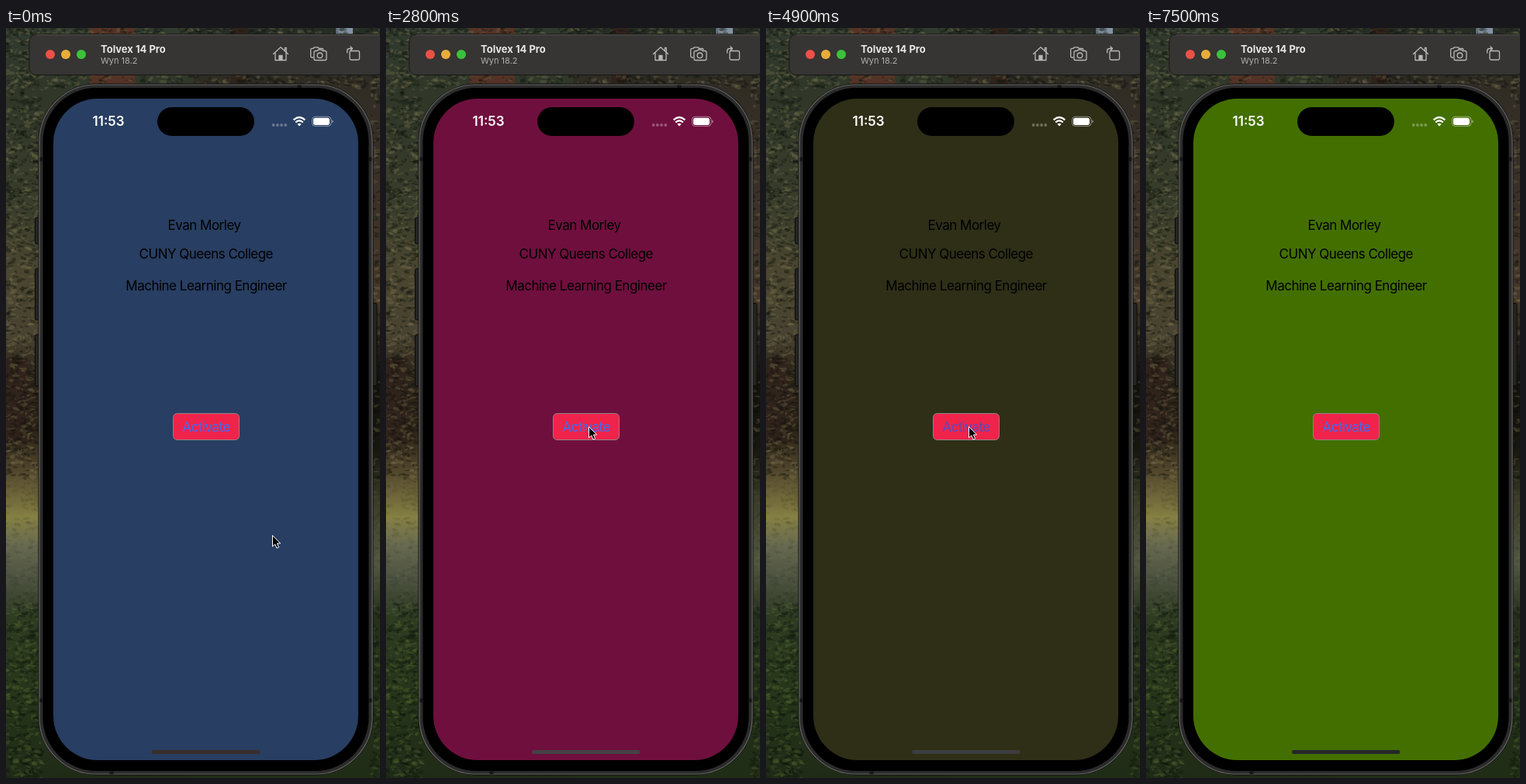
An HTML page with a canvas for the animation above (7.6 s loop, 482 by 966 pixels).

```html
<!DOCTYPE html>
<html lang="en">
<head>
<meta charset="utf-8">
<title>Colour button</title>
<style>
  html, body { margin: 0; width: 100%; height: 100%; overflow: hidden; background: #222a1e; }
  canvas, svg { position: absolute; left: 0; top: 0; width: 482px; height: 966px; }
  text { font-family: Inter, "Liberation Sans", sans-serif; }
  .label { font-size: 17px; letter-spacing: -.5px; text-anchor: middle; }
  .icon { fill: none; stroke: #bab8b6; stroke-width: 1.3; stroke-linejoin: round; stroke-linecap: round; }
</style>
</head>
<body>
<canvas id="forest" width="482" height="966"></canvas>
<svg viewBox="0 0 482 966">
  <!-- window bar -->
  <rect x="30" y="8" width="456" height="52.5" rx="9" fill="#363533" stroke="#171715"/>
  <path d="M39 9H482" stroke="#51504d"/>
  <circle cx="57" cy="34" r="6" fill="#ed5047"/>
  <circle cx="77" cy="34" r="6" fill="#e9ad3c"/>
  <circle cx="97" cy="34" r="6" fill="#3bc23c"/>
  <text x="122" y="32" font-size="13" font-weight="700" fill="#e9e7e5">Tolvex 14 Pro</text>
  <text x="122" y="46" font-size="11" fill="#b0aeac">Wyn 18.2</text>
  <g class="icon">
    <path d="M344.5 33.5L354 24.8L363.5 33.5M347 32V41.5H361V32M359.5 29V25.5H361.3V31"/>
    <path d="M352 41V35.5H356V41Z" fill="#bab8b6"/>
    <path d="M395.5 38H394.5Q392.700 38 392.700 36.200V28Q392.700 26.300 394.500 26.300H396L397.300 24.800H402L403.300 26.300H407.500Q409 26.300 409 28"/>
    <path d="M399 29.500H400.800L402.200 28H406.800L408.200 29.500H411Q413 29.500 413 31.500V39.500Q413 41.500 411 41.500H399Q397 41.500 397 39.500V31.500Q397 29.500 399 29.500Z"/>
    <circle cx="404.500" cy="35.300" r="3.300"/>
    <rect x="443" y="29.500" width="12.500" height="11.500" rx="1.800"/>
    <path d="M439.700 32V29.500Q439.700 26.500 442.700 26.500H446M444 24L446.500 26.500L444 29"/>
  </g>

  <!-- handset -->
  <g fill="#242423" stroke="#0b0b0b">
    <rect x="37.500" y="244" width="6" height="34" rx="1.500"/>
    <rect x="37.500" y="310" width="6" height="66" rx="1.500"/>
    <rect x="37.500" y="395" width="6" height="66" rx="1.500"/>
    <rect x="472" y="354.500" width="6" height="106" rx="1.500"/>
  </g>
  <rect x="41.500" y="71.500" width="432" height="891" rx="75" fill="#0c0c0c"/>
  <rect x="43" y="73" width="429" height="888" rx="73" fill="#2b2b2b" stroke="#696967" stroke-width="1.200"/>
  <rect x="47.500" y="77" width="420" height="880" rx="69" fill="#000"/>
  <path d="M43.500 169H47M468 169H471.500M43.500 866H47M468 866H471.500M378 73.500V77M136 957.500V961" stroke="#151515" stroke-width="5"/>
  <rect id="screen" x="61" y="91" width="393" height="852" rx="57"/>
  <rect x="195" y="102" width="125" height="37" rx="18.500" fill="#000"/>

  <!-- status bar -->
  <text x="111.500" y="126.300" font-size="17" font-weight="600" fill="#fff">11:53</text>
  <g fill="#fff">
    <g opacity=".3">
      <circle cx="344.700" cy="125" r="1.900"/><circle cx="349.900" cy="125" r="1.900"/>
      <circle cx="355.100" cy="125" r="1.900"/><circle cx="360.300" cy="125" r="1.900"/>
    </g>
    <path d="M378 126.500L375.400 123.800Q378 121.700 380.600 123.800Z"/>
    <rect x="396" y="115.700" width="21" height="9.200" rx="2.700"/>
    <path d="M420.300 118.200V122.400Q421.800 121.600 421.800 120.300T420.300 118.200Z" opacity=".5"/>
  </g>
  <g fill="none" stroke="#fff">
    <path d="M370.600 118.300Q378 111.700 385.400 118.300M373.200 121.500Q378 117.300 382.800 121.500" stroke-width="2.300"/>
    <rect x="394.500" y="114.200" width="24.500" height="12.200" rx="4" opacity=".45"/>
  </g>

  <!-- app -->
  <text class="label" x="255.500" y="260">Evan Morley</text>
  <text class="label" x="257.800" y="297">CUNY Queens College</text>
  <text class="label" x="258" y="338">Machine Learning Engineer</text>
  <rect x="215.500" y="496.500" width="85" height="34" rx="5" fill="#f0234b" stroke="#8b8580"/>
  <text id="action" class="label" x="258" y="520">Activate</text>
  <rect id="home" x="188" y="930" width="139.500" height="5" rx="2.500"/>
  <path id="pointer" d="M.5 .5V14.800L3.800 11.800L6 17L8.600 15.900L6.400 10.900H10.700Z" fill="#000" stroke="#fff" stroke-linejoin="round"/>
</svg>
<script>
const LOOP = 7600, STEP = 100;
const $ = id => document.getElementById(id);

// Each press: time, screen colour, home bar colour
const presses = [
  [0, '#283e62', '#392f2a'],
  [2300, '#6f0f3e', '#454145'],
  [3300, '#256066', '#382d2e'],
  [3900, '#2b5f10', '#343337'],
  [4800, '#2f2f18', '#3c3b3f'],
  [5700, '#436f00', '#26262a']
];

// Pointer path: time, x, y
const path = [
  [0, 343, 653], [700, 343, 653], [1700, 261, 513],
  [6500, 261, 513], [7100, 500, 380], [LOOP, 500, 380]
];

const ease = p => p * p * (3 - 2 * p);

function pointerAt(t) {
  const i = path.findIndex(k => k[0] > t);
  const [t0, x0, y0] = path[i - 1], [t1, x1, y1] = path[i];
  const p = ease((t - t0) / (t1 - t0));
  return [x0 + (x1 - x0) * p, y0 + (y1 - y0) * p];
}

function draw(now) {
  const t = Math.floor(now % LOOP / STEP) * STEP;
  const [, colour, bar] = presses.filter(p => p[0] <= t).pop();
  const held = presses.some(([at]) => at && t >= at - 100 && t < at + 200);
  $('screen').setAttribute('fill', colour);
  $('home').setAttribute('fill', bar);
  $('action').setAttribute('fill', held ? '#5a4bbd' : '#3c6df0');
  $('pointer').setAttribute('transform', `translate(${pointerAt(t).map(Math.round)})`);
}

function paintForest() {
  const ctx = $('forest').getContext('2d');
  let seed = 11;
  const rnd = () => (seed = seed * 16807 % 2147483647) / 2147483647;
  const fill = (x, y, w, h, stops) => {
    const g = ctx.createLinearGradient(0, 0, 0, 966);
    stops.forEach(([at, c]) => g.addColorStop(at / 966, c));
    ctx.fillStyle = g;
    ctx.fillRect(x, y, w, h);
  };
  fill(0, 0, 241, 966, [
    [0, '#303a2e'], [90, '#303728'], [230, '#393d2b'], [310, '#4a4630'],
    [400, '#484230'], [440, '#2c241a'], [520, '#2d2318'], [570, '#51462c'],
    [630, '#858043'], [665, '#686a50'], [710, '#4b513f'], [760, '#2e3b21'],
    [860, '#26351a'], [966, '#202b17']
  ]);
  fill(241, 0, 241, 966, [
    [0, '#252d25'], [70, '#302c24'], [200, '#3a3027'], [350, '#463729'],
    [450, '#14120d'], [540, '#17160f'], [620, '#3f4029'], [690, '#515740'],
    [760, '#26301b'], [966, '#202d16']
  ]);
  // trunks
  ctx.fillStyle = '#543326';
  ctx.fillRect(108, 0, 58, 76);
  ctx.fillStyle = '#30231b';
  ctx.fillRect(0, 425, 28, 110);
  ctx.fillRect(290, 0, 22, 76);
  ctx.fillStyle = '#8393a5';
  ctx.fillRect(425, 0, 22, 8);
  // foliage, drawn only where the wallpaper shows
  for (let i = 0; i < 2600; i++) {
    const r = rnd(), v = rnd();
    let x, y;
    if (r < .7) { x = rnd() * 46; y = v * 966; }
    else if (r < .82) { x = 471 + rnd() * 11; y = v * 966; }
    else { x = rnd() * 482; y = v < .4 ? rnd() * 9 : 58 + rnd() * 20; }
    const misty = y > 580 && y < 740;
    const light = y > 740 ? '95,120,55' : '132,124,84';
    ctx.fillStyle = rnd() < .58
      ? `rgba(10,14,9,${misty ? .07 : .32})`
      : `rgba(${light},${misty ? .1 : .27})`;
    ctx.beginPath();
    ctx.ellipse(x, y, 1 + rnd() * 4, .7 + rnd() * 1.7, rnd() - .5, 0, 7);
    ctx.fill();
  }
}

paintForest();
const start = performance.now();
function frame() {
  draw(performance.now() - start);
  requestAnimationFrame(frame);
}
frame();
</script>
</body>
</html>
```
